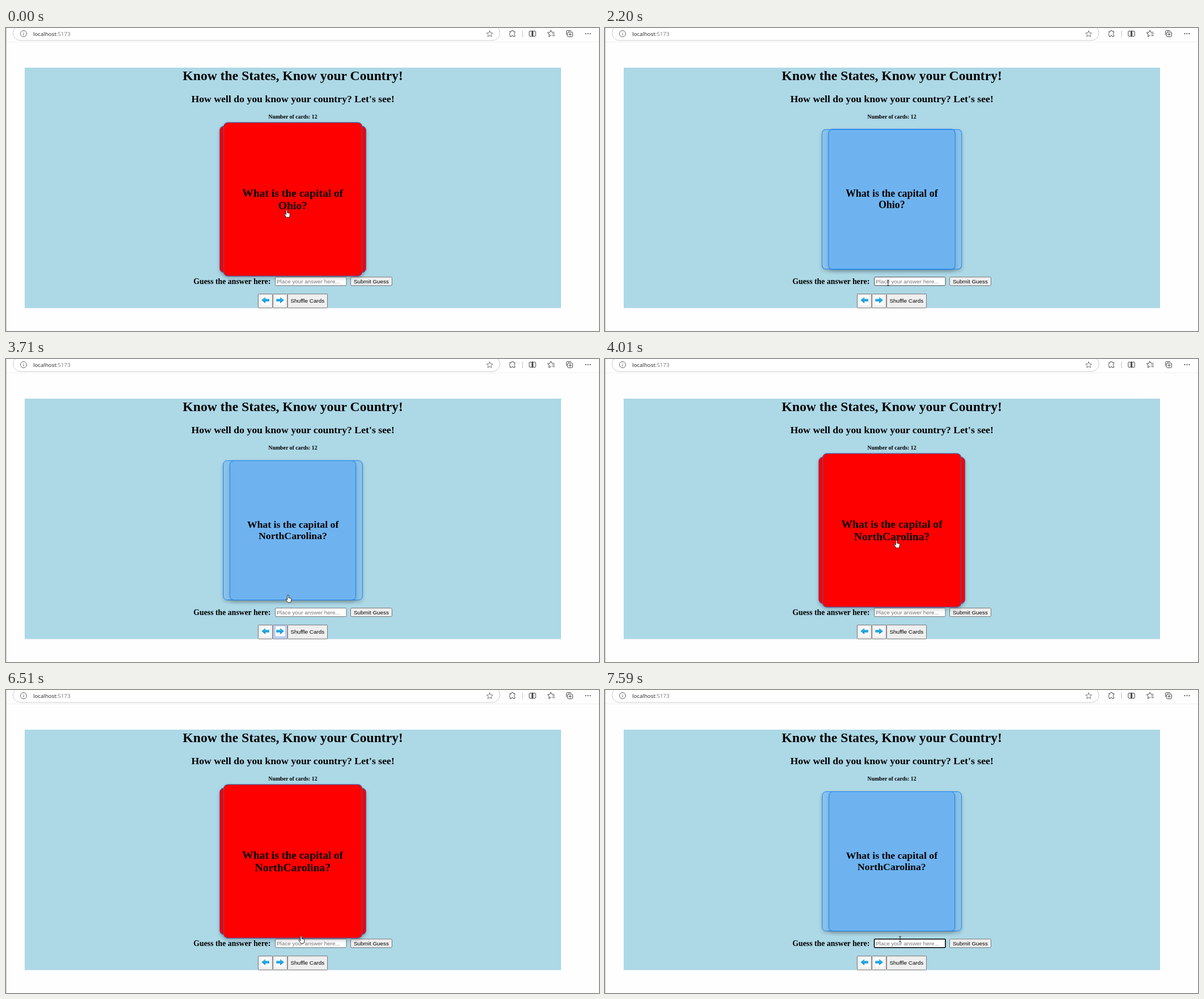
An HTML page that plays this animation: 1047 px wide and 535 px high, repeating every 8000 ms.

```html
<!DOCTYPE html>
<html lang="en">
<head>
<meta charset="utf-8">
<title>State flashcards</title>
<style>
  html, body { margin: 0; width: 100%; height: 100%; overflow: hidden; background: #fefefe; }
  svg, #back { position: absolute; left: 0; top: 0; }
  svg { width: 1047px; height: 535px; }
  .serif { font: bold 17.76px "Liberation Serif", "Times New Roman", serif; }
  .mid { text-anchor: middle; }
  .sans { font: 9.87px "Liberation Sans", Arial, sans-serif; }
  .url { font: 9.75px "Open Sans", "Noto Sans", sans-serif; }
  .icon { fill: none; stroke: #444; stroke-width: 1; stroke-linejoin: round; stroke-linecap: round; }
  .button { fill: #efefef; stroke: #767676; }

  #back, #front {
    box-sizing: border-box; border: 1px solid rgb(30,130,235); border-radius: 7.5px;
    background: rgba(30,130,250,.25); box-shadow: 0 3px 6px rgba(0,0,0,.2);
  }
  #back { left: 383px; top: 179px; width: 247px; height: 246.5px; }
  #front {
    position: absolute; left: 11.25px; top: -1px; width: 222.5px; height: 246.5px;
    display: flex; align-items: center; justify-content: center;
    text-align: center; white-space: pre; line-height: 20.3px; color: #000;
  }
  .hot, .hot #front { background: red !important; border-color: #4a62a8 !important; }
</style>
</head>
<body>
<svg viewBox="0 0 1047 535">
  <defs>
    <linearGradient id="sky" x2="0" y2="1">
      <stop stop-color="#3cc4f0"/><stop offset="1" stop-color="#0a86cf"/>
    </linearGradient>
    <filter id="soft"><feGaussianBlur stdDeviation="1"/></filter>
    <path id="star" d="M0-5.5 1.6-1.9 5.4-1.6 2.5 1 3.4 4.8 0 2.8-3.4 4.8-2.5 1-5.4-1.6-1.6-1.9z"/>
    <path id="arrow" d="M-6.8-2.3H0V-5.6L7 0 0 5.6V2.3H-6.8z" fill="url(#sky)"/>
  </defs>

  <!-- browser bar -->
  <path d="M0 24.5H1047" stroke="#f0f0f0"/>
  <path d="M.5 0V535" stroke="#c4c4c4"/>
  <rect x="12.5" y="-4.5" width="859.5" height="26.5" rx="13" fill="#fff" stroke="#ccc"/>
  <text class="url" x="48" y="13.5" fill="#222">localhost<tspan fill="#777">:5173</tspan></text>
  <g class="icon">
    <circle cx="31" cy="10" r="5.5" stroke="#666"/>
    <path d="M31 9.5V12.8M31 7.2V7.3" stroke="#666"/>
    <use href="#star" x="854" y="10.5" stroke="#777"/>
    <path d="M890 6h2.5a1.6 1.6 0 0 1 3.2 0h2.6v3a1.6 1.6 0 0 0 0 3v3h-2.6a1.6 1.6 0 0 0-3.2 0H890v-3a1.6 1.6 0 0 1 0-3z"/>
    <path d="M912 5V15.500" stroke="#bbb"/>
    <path d="M928 5.500h-3q-1.200 0-1.200 1.200v6.600q0 1.200 1.200 1.200h3zM931 5.500h3q1.200 0 1.200 1.200v6.600q0 1.200-1.200 1.200h-3zM929.500 4.500v11"/>
    <path d="M962.500 13 958.500 15.200 959.200 11 956.200 8.200 960.200 7.600 962 4 963.800 7.600H968M965 10.500h3.500M965 13.500h3.500"/>
    <rect x="991.500" y="7" width="9" height="8.500" rx="2"/>
    <path d="M989.500 12V6.500q0-2 2-2h6M996 9v4.500M993.800 11.200h4.500"/>
  </g>
  <g fill="#333"><circle cx="1023.500" cy="10" r="1"/><circle cx="1027.500" cy="10" r="1"/><circle cx="1031.500" cy="10" r="1"/></g>

  <!-- page -->
  <rect x="33" y="70" width="947" height="424.500" fill="#add8e6"/>
  <g class="serif">
    <text class="mid" x="506.500" y="92" style="font-size:23.680px">Know the States, Know your Country!</text>
    <text class="mid" x="506.500" y="130.500">How well do you know your country? Let's see!</text>
    <text class="mid" x="506.500" y="159.500" style="font-size:9.830px">Number of cards: 12</text>
    <text x="331" y="451.500" style="font-size:13.800px">Guess the answer here:</text>
  </g>
  <rect id="field" x="475.500" y="439.800" width="125.500" height="15" rx="1.500" fill="#fff"/>
  <rect class="button" x="608.500" y="439.800" width="73" height="15" rx="2"/>
  <rect class="button" x="445.300" y="469.700" width="25.500" height="24.500" rx="1"/>
  <rect class="button" x="471.300" y="469.700" width="25.500" height="24.500" rx="1"/>
  <rect class="button" x="497.300" y="469.700" width="70.200" height="24.500" rx="1"/>
  <rect id="glow" x="473.500" y="471.500" width="21" height="21" fill="#b4c8f8" stroke="#8fb0f5" stroke-width="2" filter="url(#soft)"/>
  <path d="M449.500 472h17v17.500h-17zM475.800 472h17v17.500h-17z" fill="#fafafa"/>
  <use href="#arrow" transform="translate(458 480.500) scale(-1 1)"/>
  <use href="#arrow" transform="translate(484 480.500)"/>
  <g class="sans">
    <text x="478" y="450.600" fill="#757575">Place your answer here...</text>
    <text class="mid" x="645" y="450.600">Submit Guess</text>
    <text class="mid" x="532.300" y="485">Shuffle Cards</text>
  </g>
  <path id="caret" d="M478.300 442V453" stroke="#000" stroke-width=".8"/>
</svg>

<div id="back"><div id="front" class="serif"></div></div>

<svg viewBox="0 0 1047 535">
  <g id="pointer" stroke="#111" stroke-width=".9" stroke-linejoin="round" fill="#fff">
    <path id="hand" d="M-1.200 8V1.400a1.200 1.200 0 0 1 2.400 0V5.200l3.600.8q1.400.4 1.200 1.800l-.7 4.200q-.2 1.500-1.600 1.500H.6q-.9 0-1.500-.8l-3-4.200q-.4-1.200.8-1.300 1 .1 2.100 1.600z"/>
    <path id="beam" fill="none" d="M-2-5Q0-5 0-4Q0-5 2-5M0-4V4M-2 5Q0 5 0 4Q0 5 2 5"/>
    <path id="wedge" d="M.5.5V10L2.800 8 4.300 11.500 5.700 10.900 4.200 7.500H7.300z"/>
  </g>
</svg>

<script>
const $ = id => document.getElementById(id);
const LOOP = 8000;
const ask = state => `What is the capital of\n${state}?`;

// Each track lists [start ms, ...values]; a value holds until the next start.
const pointer = [
  [0, 'hand', 495.5, 321], [150, 'hand', 495.5, 320.5],
  [1210, 'hand', 496.5, 319.5], [1330, 'hand', 497.5, 318],
  [1790, 'hand', 501, 367], [1930, 'hand', 500.5, 408], [2050, 'hand', 500, 437],
  [2200, 'beam', 499.8, 450], [2340, 'wedge', 495, 460], [2460, 'wedge', 494.3, 464],
  [2610, 'wedge', 494.3, 466], [2760, 'hand', 491.5, 480], [2880, 'hand', 491, 482],
  [3560, 'hand', 490.5, 482.5], [3710, 'hand', 498, 416.5], [3870, 'hand', 507, 360],
  [4010, 'hand', 514.5, 320], [4180, 'hand', 521, 312],
  [6390, 'hand', 520, 370], [6510, 'hand', 521, 434],
  [6660, 'beam', 524.5, 446], [6780, 'beam', 526, 446],
  [7220, 'beam', 526, 444], [7470, 'beam', 527, 442], [7590, 'beam', 521, 440]
];
const zoom = [[0, 1.05], [2200, 1.003], [2340, 1], [3870, 1.048], [4010, 1.05], [6660, 1.016], [6780, 1]];
const hot = [[0, true], [2200, false], [3870, true], [6660, false]];
const label = [
  [0, ask('Ohio')], [410, 'Columbus'], [1090, ask('Ohio')],
  [3180, ask('NorthCarolina')], [5380, 'Raleigh'], [5980, ask('NorthCarolina')]
];
const glow = [[0, 0], [2760, .3], [2880, .7], [3030, 1], [3710, .75], [3870, 0]];

const at = (track, t) => track.findLast(key => key[0] <= t).slice(1);
const show = (id, on) => $(id).style.display = on ? '' : 'none';

function draw() {
  const t = performance.now() % LOOP;
  const [kind, x, y] = at(pointer, t);
  for (const id of ['hand', 'beam', 'wedge']) show(id, id === kind);
  $('pointer').setAttribute('transform', `translate(${x} ${y})`);

  const scale = `scale(${at(zoom, t)})`;
  $('back').style.transform = $('front').style.transform = scale;
  $('back').className = at(hot, t)[0] ? 'hot' : '';
  const [text] = at(label, t);
  if ($('front').textContent !== text) $('front').textContent = text;

  const focused = t >= 7070;
  $('field').style.stroke = focused ? '#000' : kind === 'beam' ? '#4f4f4f' : '#767676';
  $('field').style.strokeWidth = focused ? 1.6 : 1;
  show('caret', focused && t < 7590);
  $('glow').style.opacity = at(glow, t)[0];
  requestAnimationFrame(draw);
}
draw();
</script>
</body>
</html>
```
